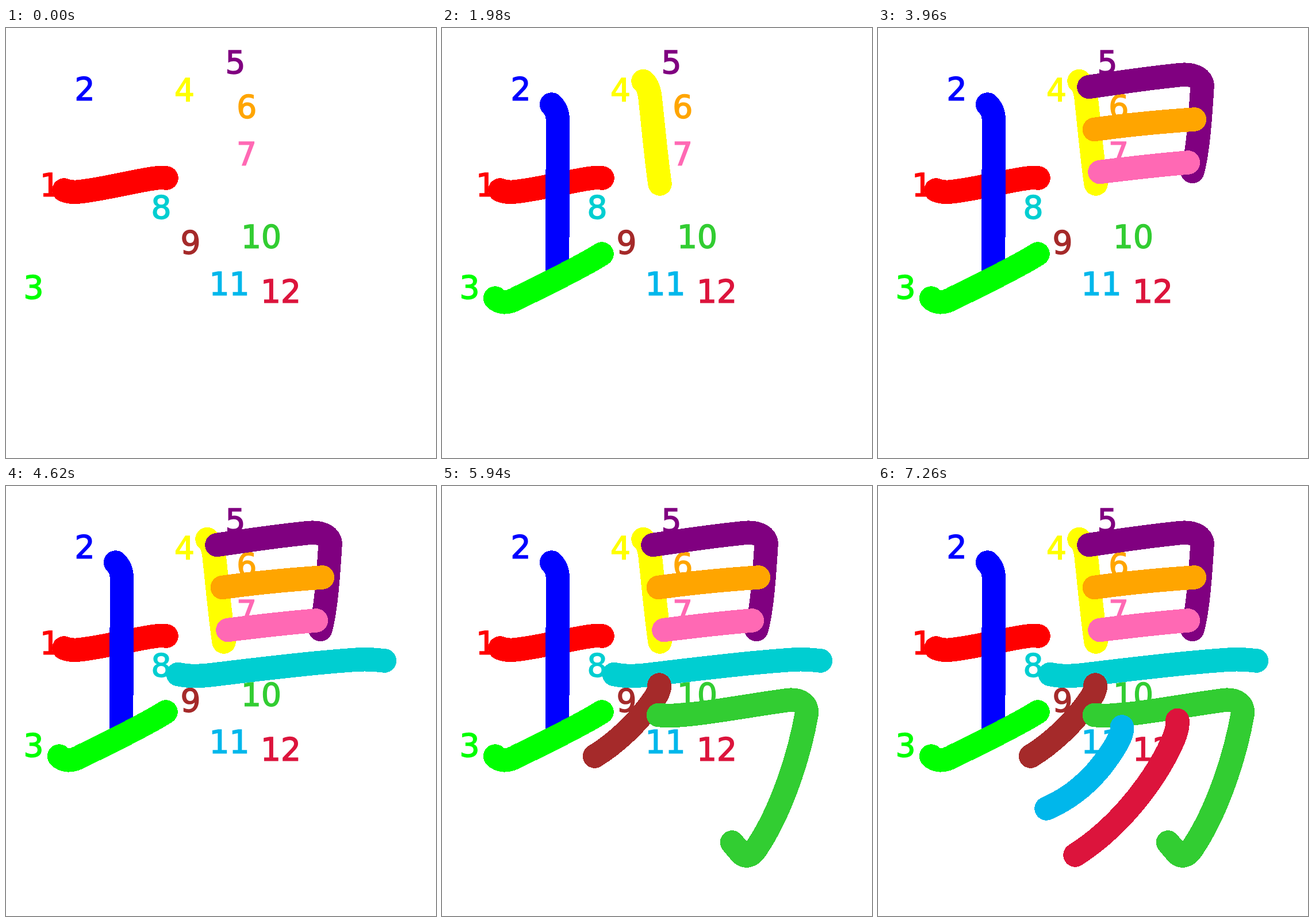
Recreate the animation shown at these times as an HTML page. Size 748 by 748 pixels, loop 7920 ms.

```html
<!DOCTYPE html>
<html lang="en">
<head>
<meta charset="utf-8">
<title>Stroke order</title>
<style>
  html, body { margin: 0; width: 100%; height: 100%; overflow: hidden; background: #fff; }
  svg { display: block; width: 100%; height: 100%; }
  text { font: 55px "DejaVu Sans", Verdana, sans-serif; stroke-width: 1.6; }
  path {
    fill: none; stroke-width: 41.5; stroke-linecap: round; stroke-linejoin: round;
    shape-rendering: crispEdges;
  }
</style>
</head>
<body>
<svg viewBox="0 0 748 748"><g id="labels"></g><g id="strokes"></g></svg>
<script>
const STEP = 660;

// colour, label x, label baseline, brush path
const strokes = [
  ["#ff0000", 59, 292, "M101 282C108 285 116 286 126 285C168 281 227 265 262 261Q270 260 279 261"],
  ["#0000ff", 119.5, 125, "M190.5 133C198 140 201.5 151 201.5 162C201.5 250 200.5 380 200.5 426"],
  ["#00ff00", 30.5, 470, "M92.5 470C100 477.5 111 479.5 126 472.5C152 459 236 420 278 393"],
  ["#ffff00", 293, 127, "M350 92.5C358 99 361 112 362 121C366 155 372 224 379 271"],
  ["#800080", 381.5, 79, "M367 102.5C425 94 470 87 527 81.5C549 79.5 565 88 564 102C561 150 557 214 547 249.5"],
  ["#ffa500", 401.3, 155.5, "M376.5 176.5C430 169 490 163 550.5 159"],
  ["#ff69b4", 401, 238, "M386 250.5C430 245 490 238 539.5 234"],
  ["#00ced1", 252.5, 331, "M299.5 327.5C315 331 336 331 354 329C430 320 530 307 613 302Q637 301 658.5 304"],
  ["#a52a2a", 303.5, 392, "M378 346C380 356 370 370 361 382C338 413 302 448 265.5 470"],
  ["#32cd32", 409, 382, "M376.5 398.5C400 401 425 398 450 395C505 388 552 379 602 372.5C625 370 637 382 634 398C622 466 592 563 547 630C537 645 527 647 518 636L504.5 620"],
  ["#00b7eb", 353.5, 464, "M424.5 419C426 430 417 446 408 460C380 504 342 540 293 561"],
  ["#dc143c", 443, 477, "M521 407.5C522 424 515 440 504 462C468 532 408 601 343 642"]
];

function add(parent, tag, attrs) {
  const el = document.createElementNS("http://www.w3.org/2000/svg", tag);
  for (const key in attrs) el.setAttribute(key, attrs[key]);
  return document.getElementById(parent).appendChild(el);
}

const paths = strokes.map(([color, x, y, d], i) => {
  add("labels", "text", { x, y, fill: color, stroke: color }).textContent = i + 1;
  return add("strokes", "path", { d, stroke: color });
});

const start = performance.now();

function draw(now) {
  const time = Math.max(0, now - start) % (STEP * paths.length);
  const last = Math.floor(time / STEP);
  paths.forEach((path, i) => {
    path.style.visibility = i <= last ? "visible" : "hidden";
  });
  requestAnimationFrame(draw);
}
draw(start);
</script>
</body>
</html>
```
